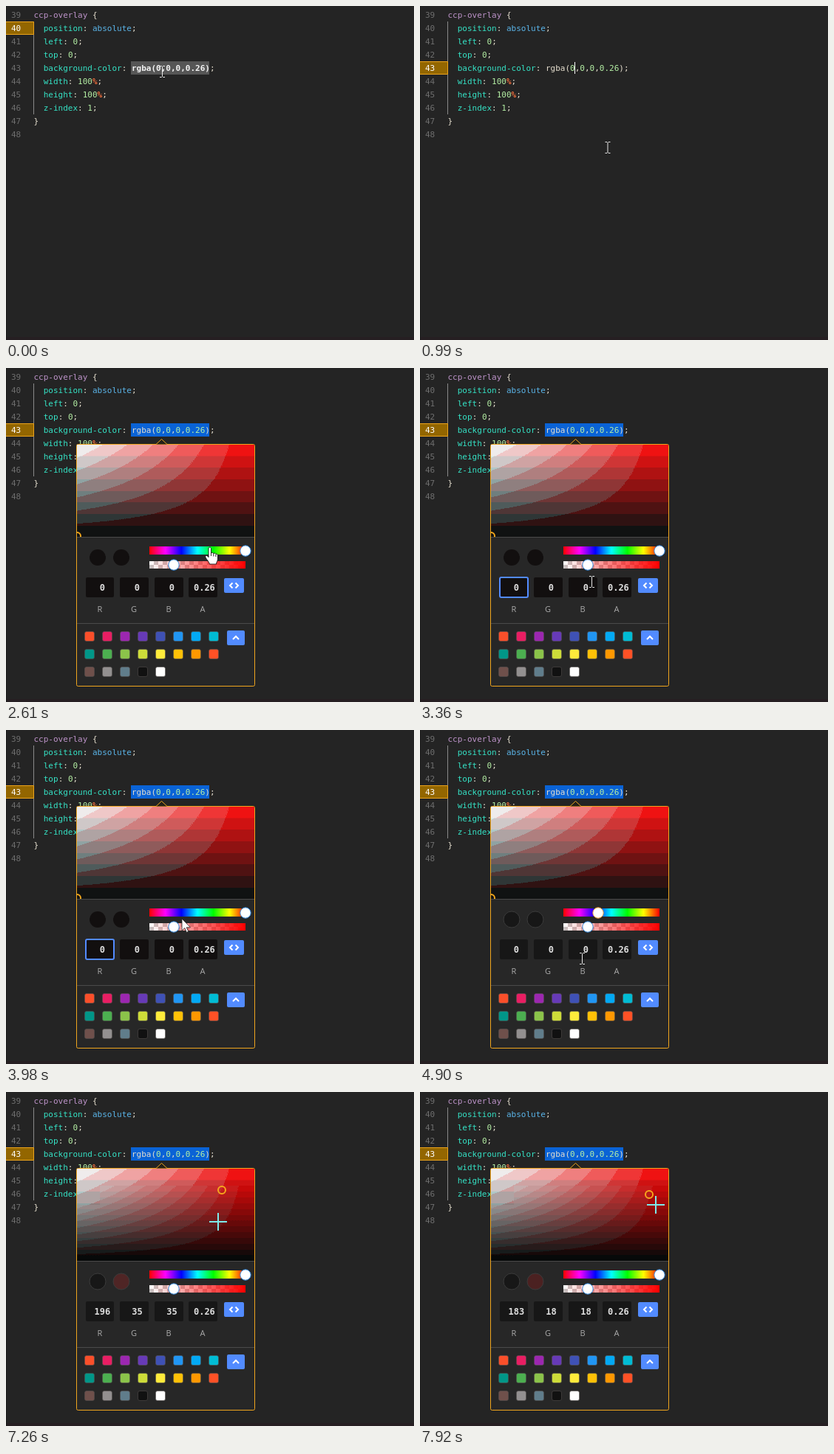
Recreate the animation shown at these times as an HTML page. Size 552 by 453 pixels, loop 8000 ms.

```html
<!DOCTYPE html>
<html lang="en">
<head>
<meta charset="utf-8">
<title>Colour picker in a style sheet</title>
<style>
  html, body { margin: 0; width: 100%; height: 100%; overflow: hidden; background: #242424; }
  svg { display: block; width: 552px; height: 453px; }
  text { white-space: pre; font: 11px "DejaVu Sans Mono", monospace; }
  .num { fill: #6e6e6e; }
  .num.on { fill: #fff; }
  .sel { fill: #bd93c9; }
  .prop { fill: #35e3c6; }
  .key { fill: #5ab4e8; }
  .val { fill: #b5f0a5; }
  .unit { fill: #f5703d; font-weight: bold; }
  .pun { fill: #e6dfcf; }
  .strong tspan { fill: #f4f4f4; font-weight: bold; }
  .field { fill: #dedede; font-size: 12px; font-weight: bold; text-anchor: middle; }
  .label { fill: #aaa; font: 11px "Open Sans", sans-serif; text-anchor: middle; }
</style>
</head>
<body>
<svg id="stage" viewBox="0 0 552 453" xmlns="http://www.w3.org/2000/svg"></svg>
<script>
const LOOP = 8000;
const stage = document.getElementById('stage');
const $ = id => document.getElementById(id);
const rect = (x, y, w, h, fill, more = '') =>
  `<rect x="${x}" y="${y}" width="${w}" height="${h}" fill="${fill}" ${more}/>`;
const span = (cls, s) => `<tspan class="${cls}">${s}</tspan>`;

// Code listing
const decl = (name, ...value) =>
  span('prop', '  ' + name) + span('pun', ': ') + value.join('') + span('pun', ';');
const percent = span('val', '100') + span('unit', '%');
const zero = span('val', '0');
const comma = span('pun', ',');
const rgba = '<tspan id="rgba">' + span('pun', 'rgba(') +
  [zero, zero, zero, span('val', '0.26')].join(comma) + span('pun', ')') + '</tspan>';
const lines = [
  span('sel', 'ccp-overlay ') + span('pun', '{'),
  decl('position', span('key', 'absolute')),
  decl('left', zero),
  decl('top', zero),
  decl('background-color', rgba),
  decl('width', percent),
  decl('height', percent),
  decl('z-index', span('val', '1')),
  span('pun', '}'),
  ''
];
const code = lines.map((s, i) =>
  `<text class="num" id="n${39 + i}" x="7" y="${16 + 18 * i}">${39 + i}</text>` +
  `<text x="37.5" y="${16 + 18 * i}">${s}</text>`).join('');

// Colour picker parts
const levels = n => Array.from({ length: n }, (_, i) => ((i + .5) / n).toFixed(3)).join(' ');
const banding = (id, red, rest) =>
  `<filter id="${id}" x="0" y="0" width="1" height="1" color-interpolation-filters="sRGB"><feComponentTransfer>
    <feFuncR type="discrete" tableValues="${levels(red)}"/>
    <feFuncG type="discrete" tableValues="${levels(rest)}"/>
    <feFuncB type="discrete" tableValues="${levels(rest)}"/>
  </feComponentTransfer></filter>`;
const field = filter => `<g filter="url(#${filter})">` +
  rect(96, 104, 240, 125, 'url(#tint)') + rect(96, 104, 240, 125, 'url(#shade)') + '</g>';
const stops = (...list) => list.map((s, i) =>
  `<stop offset="${i / (list.length - 1)}" stop-color="${s}"/>`).join('');

const palette = [
  '#fa4f2a #e91e63 #9c27b0 #673ab7 #3f51b5 #2196f3 #03a9f4 #00bcd4',
  '#009688 #4caf50 #8bc34a #cddc39 #ffeb3b #ffc107 #ff9800 #ff5126',
  '#6f504b #939090 #607d8b #111111 #ffffff'
].map(row => row.split(' '));
const swatches = palette.map((row, j) => row.map((c, i) =>
  rect(106.5 + 24 * i, 357.5 + 24 * j, 13, 13, c, 'rx="2.5" stroke="#55504e" stroke-width=".6"')
).join('')).join('');

const boxes = [108, 154, 201, 247].map((x, i) =>
  rect(x, 284, i === 0 ? 38 : 39, 27, '#171717', 'class="dark" rx="2"')).join('');
const values = [130, 177, 224, 268].map((x, i) =>
  `<text class="field" id="v${i}" x="${x + .4}" y="302">${i === 3 ? '0.26' : '0'}</text>`).join('');
const labels = [127, 173, 220, 266].map((x, i) =>
  `<text class="label" x="${x}" y="331">${'RGBA'[i]}</text>`).join('');
const button = (x, y, w, h, icon) => rect(x, y, w, h, '#528bff', 'rx="2"') +
  `<path d="${icon}" fill="none" stroke="#fff" stroke-width="2"/>`;

stage.innerHTML = `
<defs>
  <linearGradient id="tint">${stops('#fff', '#f00')}</linearGradient>
  <linearGradient id="shade" x2="0" y2="1">
    <stop offset="0" stop-opacity="0"/><stop offset="1"/>
  </linearGradient>
  <linearGradient id="hues">${stops('#f00', '#f0f', '#00f', '#0ff', '#0f0', '#ff0', '#f00')}</linearGradient>
  <linearGradient id="fade">
    <stop offset="0" stop-color="#f00" stop-opacity="0"/><stop offset="1" stop-color="#f00"/>
  </linearGradient>
  <pattern id="check" x="194" y="262" width="12" height="10" patternUnits="userSpaceOnUse">
    ${rect(0, 0, 12, 10, '#fff')}${rect(6, 0, 6, 5, '#c8c4c4')}${rect(0, 5, 6, 5, '#c8c4c4')}
  </pattern>
  ${banding('coarse', 8, 7)}${banding('fine', 16, 14)}
  <clipPath id="area">${rect(96, 104, 240, 125, '#000')}</clipPath>
  <clipPath id="low">${rect(96, 153, 240, 76, '#000')}</clipPath>
  <clipPath id="mid">${rect(127, 127, 209, 102, '#000')}</clipPath>
</defs>
${rect(0, 0, 552, 453, '#242424')}
${rect(0, 449, 552, 4, '#261f22')}
${rect(0, 0, 1, 453, '#1a1a1a')}
${rect(37, 21, 1, 126, '#8a8a8a')}
<g id="gutter">${rect(0, 0, 38, 18, '#936600')}
  <path d="M0 .5H37.5V17.5H0" fill="none" stroke="#eda41c"/></g>
<rect id="mark" x="169" y="75" width="106" height="18"/>
${code}
${rect(209, 76, 1, 16, '#fff', 'id="caret"')}
<g id="panel">
  ${rect(95.5, 103.5, 241, 328, '#272727', 'rx="2" stroke="#f0a61e"')}
  <path d="M203 103.5L210.5 96.5L218 103.5" fill="#242018" stroke="#f0a61e"/>
  ${field('coarse')}
  <g id="lowFine" clip-path="url(#low)">${field('fine')}</g>
  <g id="midFine" clip-path="url(#mid)">${field('fine')}</g>
  ${rect(96, 229, 240, 1, '#4a4a4a')}${rect(96, 346, 240, 1, '#4a4a4a')}
  <g clip-path="url(#area)"><circle id="pick" r="5" fill="none" stroke="#f7a81c" stroke-width="2"/></g>
  <circle class="dark disc" cx="124" cy="257" r="11"/>
  <circle class="disc" id="preview" cx="156" cy="257" r="11"/>
  ${rect(194, 242, 130, 11, 'url(#hues)')}
  ${rect(194, 262, 130, 10, 'url(#check)')}${rect(194, 262, 130, 10, 'url(#fade)')}
  <circle id="hue" cy="248" r="7.2" fill="#fff"/>
  <circle cx="227" cy="267" r="7.2" fill="#fff" stroke="#2f86dc"/>
  ${boxes}
  ${rect(108, 284, 38, 27, 'none', 'id="focus" rx="2" stroke="#528bff" stroke-width="2"')}
  ${values}${labels}
  ${rect(134, 291, 1, 14, '#fff', 'id="fieldCaret"')}
  ${button(295, 285, 27, 20, 'M306.5 291.5L303 295L306.5 298.5M310.5 291.5L314 295L310.5 298.5')}
  ${button(299, 356, 24, 20, 'M307 368L311 364L315 368')}
  ${swatches}
</g>
<g id="pointer">
  <path id="beam" d="M-3.5 -7.5H-1L0 -6.5L1 -7.5H3.5M0 -6.5V6.5M-3.5 7.5H-1L0 6.5L1 7.5H3.5" fill="none" stroke="#e8e8e8"/>
  <path id="arrow" d="M0 0V16L3.8 12.6L6.4 18.4L8.8 17.3L6.2 11.8H11.5Z" fill="#fff" stroke="#222" stroke-width=".8"/>
  <path id="hand" d="M-1.5 1C-1.5 -1.5 2 -1.5 2 1V7C3 6 5 6.3 5.3 7.7C6.5 6.7 8 7.2 8.4 8.5C9.6 7.8 11 8.6 11 10V15C11 18 9 19 9 22H0C-1 18.5 -3.5 16.5 -5.5 13C-6.5 10.5 -4 9.5 -2.5 11.5L-1.5 12.7Z M2 7V11M5.3 8V11.5M8.4 9V12" fill="#fff" stroke="#111" stroke-width=".9"/>
  <path id="cross" d="M-12 0H12M0 -12V12" fill="none" stroke="#7eeaea" stroke-width="2"/>
</g>`;

// Pointer moves: start, end, steps, way points
const moves = [
  [920, 1050, 3, [[211.5, 89], [275.5, 244]]],
  [3110, 3860, 10, [[275, 244], [222, 302], [231, 276]]],
  [3920, 4100, 4, [[231, 276], [238, 256], [241, 250]]],
  [4660, 4866, 4, [[241, 250], [219.5, 310]]],
  [4925, 4935, 1, [[219.5, 310], [212, 318]]],
  [5000, 5340, 5, [[212, 318], [178, 177]]],
  [5470, 5530, 2, [[178, 177], [178, 164]]],
  [6230, 6320, 2, [[178, 164], [303, 162], [348, 162]]],
  [6510, 7010, 8, [[348, 162], [301, 147]]],
  [7260, 7920, 11, [[301, 147], [224, 308], [319, 153]]]
];

function along(points, p) {
  const u = p * (points.length - 1);
  const i = Math.min(Math.floor(u), points.length - 2);
  return points[i].map((a, k) => a + (points[i + 1][k] - a) * (u - i));
}

function pointerAt(t) {
  let pos = moves[0][3][0];
  for (const [from, to, n, points] of moves) {
    if (t < from) break;
    const step = n < 2 ? 1 : 1 + Math.floor((t - from) / (to - from) * (n - 1) + 1e-6);
    pos = along(points, Math.min(step / n, 1));
  }
  return pos;
}

function pointerKind(t, y) {
  if (t < 2610) return 'beam';
  if (y < 235) return 'cross';
  if (y < 254 || (y > 261 && y < 273 && t > 4200)) return 'hand';
  return y > 283 && y < 313 ? 'beam' : 'arrow';
}

// Picked colour: start, marker x, marker y, red, green and blue
const picks = [
  [0, 96, 228, 0, 0],
  [5340, 170, 165, 130, 89],
  [7010, 292, 133, 196, 35],
  [7920, 310, 139, 183, 18]
];

const within = (t, ...spans) => spans.some(([a, b]) => t >= a && t < b);
const show = (id, on) => $(id).setAttribute('visibility', on ? 'visible' : 'hidden');
const set = (el, attrs) => { for (const k in attrs) el.setAttribute(k, attrs[k]); };

function draw(t) {
  const open = t >= 2610, first = t < 610;
  $('gutter').setAttribute('transform', `translate(0 ${first ? 21 : 75})`);
  $('n40').classList.toggle('on', first);
  $('n43').classList.toggle('on', !first);
  $('rgba').classList.toggle('strong', first);
  set($('mark'), { fill: first ? '#565656' : open ? '#0a63d6' : 'none' });
  show('caret', within(t, [610, 1050], [1480, 1860], [2240, 2610]));

  $('panel').style.display = open ? '' : 'none';
  show('lowFine', t >= 5340);
  show('midFine', t >= 7010);
  show('focus', within(t, [2680, 4280]));
  show('fieldCaret', within(t, [2680, 3110], [3550, 3860]));
  const dark = t < 4280 ? '#120f0f' : '#171717';
  document.querySelectorAll('.dark').forEach(el => set(el, { fill: dark }));
  document.querySelectorAll('.disc').forEach(el => set(el, { stroke: t < 4280 ? 'none' : '#3b3b3b' }));
  const moved = within(t, [4280, 5340]);
  set($('hue'), { cx: moved ? 241 : 324, stroke: moved ? '#f7a030' : '#2f86dc' });

  const [, px, py, r, g] = picks.filter(p => t >= p[0]).pop();
  set($('pick'), { cx: px, cy: py });
  set($('preview'), { fill: r ? `rgba(${r},${g},${g},.26)` : dark });
  [r, g, g].forEach((v, i) => { $('v' + i).textContent = v; });

  const [x, y] = pointerAt(t);
  const kind = pointerKind(t, y);
  set($('pointer'), { transform: `translate(${Math.round(x * 2) / 2} ${Math.round(y)})` });
  for (const id of ['beam', 'arrow', 'hand', 'cross']) show(id, id === kind);
}

const start = performance.now();
function tick() {
  draw((performance.now() - start) % LOOP);
  requestAnimationFrame(tick);
}
tick();
</script>
</body>
</html>
```
